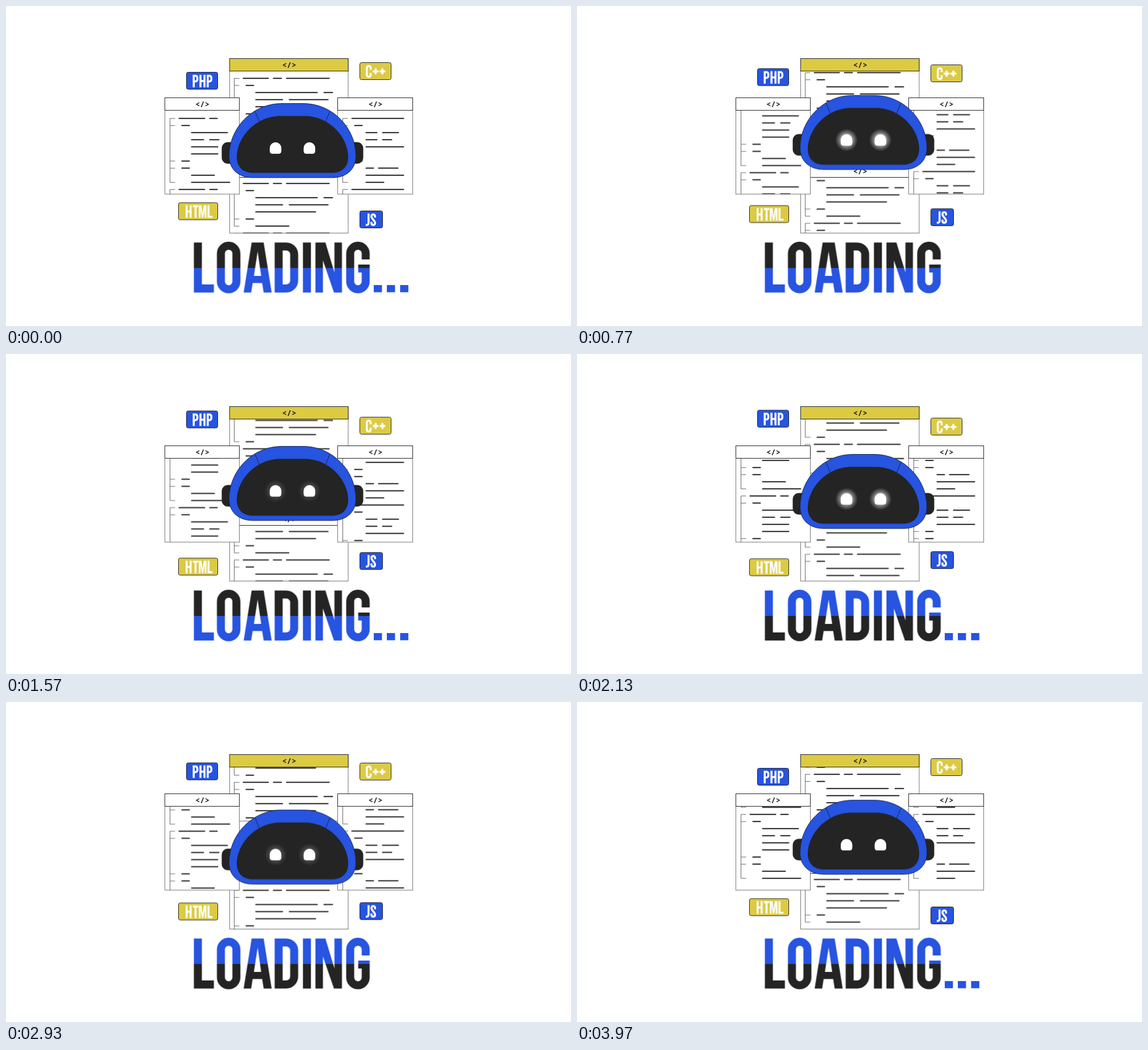
Animation, 994 px wide and 563 px high, one loop 4010 ms. Source, as an HTML page:

```html
<!DOCTYPE html>
<html lang="en">
<head>
<meta charset="utf-8">
<title>Loading</title>
<style>
  html, body { margin: 0; width: 100%; height: 100%; overflow: hidden; background: #fff; }
  svg { display: block; }
  :root { --loop: 4010ms; --ink: #242424; --blue: #2754e0; --gold: #dcca43; }

  .body { fill: #fff; stroke: #777; }
  .head { stroke: #222; }
  .tag { font: bold 14px "Noto Sans Mono", "DejaVu Sans Mono", monospace; text-anchor: middle; fill: #222; }
  .code { fill: none; stroke: #222; stroke-width: 2.1; stroke-linecap: round; }
  .rail { fill: none; stroke: #555; stroke-width: .9; }
  .outline { stroke: #1c2340; stroke-width: 1; }
  .badge rect { stroke: #222; }

  .scroll { animation: scroll var(--loop) linear infinite; }
  @keyframes scroll {
    0% { transform: none; }
    19.2% { transform: translateY(var(--s0)); }
    39.2% { transform: translateY(var(--s1)); }
    53.1% { transform: translateY(var(--s2)); }
    73.1% { transform: translateY(var(--s3)); }
    83% { transform: translateY(var(--s4)); }
    99%, 100% { transform: translateY(var(--s5)); }
  }

  .robot { animation: bob var(--loop) infinite; }
  @keyframes bob {
    0% { transform: none; animation-timing-function: cubic-bezier(.61, 1, .88, 1); }
    25% { transform: translateY(-15.3px); animation-timing-function: cubic-bezier(.37, 0, .63, 1); }
    75% { transform: translateY(18.6px); animation-timing-function: cubic-bezier(.12, 0, .39, 0); }
    100% { transform: none; }
  }

  .glow { animation: glow calc(var(--loop) / 6) cubic-bezier(.37, 0, .63, 1) infinite alternate; }
  @keyframes glow { from { opacity: 0; } to { opacity: 1; } }

  .badge { animation: float calc(var(--loop) / 2) cubic-bezier(.37, 0, .63, 1) infinite alternate; }
  @keyframes float { to { transform: translateY(var(--rise)); } }

  .upper { animation: upper var(--loop) step-end infinite; }
  .lower { animation: lower var(--loop) step-end infinite; }
  @keyframes upper { 0% { stop-color: #242424; } 50%, 100% { stop-color: #2754e0; } }
  @keyframes lower { 0% { stop-color: #2754e0; } 50%, 100% { stop-color: #242424; } }

  .dot { fill: var(--blue); animation: calc(var(--loop) / 2) step-end infinite; }
  .dot1 { animation-name: dot1; }
  .dot2 { animation-name: dot2; }
  .dot3 { animation-name: dot3; }
  @keyframes dot1 { 0% { opacity: 1; } 31% { opacity: 0; } 50%, 100% { opacity: 1; } }
  @keyframes dot2 { 0% { opacity: 1; } 31% { opacity: 0; } 60%, 100% { opacity: 1; } }
  @keyframes dot3 { 0% { opacity: 1; } 31% { opacity: 0; } 70%, 100% { opacity: 1; } }
</style>
</head>
<body>
<svg width="994" height="563" viewBox="0 0 994 563">
  <defs>
    <radialGradient id="halo">
      <stop offset=".4" stop-color="#fff" stop-opacity=".75"/>
      <stop offset=".7" stop-color="#fff" stop-opacity=".32"/>
      <stop offset="1" stop-color="#fff" stop-opacity="0"/>
    </radialGradient>
    <linearGradient id="duo" gradientUnits="userSpaceOnUse" x1="0" y1="0" x2="0" y2="100">
      <stop class="upper" offset=".505"/>
      <stop class="lower" offset=".505"/>
    </linearGradient>
    <path id="eye" d="M464 250a10.2 10.2 0 0 1 20.4 0v5q0 5-5 5h-10.4q-5 0-5-5z" fill="#fff"/>
  </defs>

  <g id="windows"></g>

  <g class="robot">
    <rect x="379.5" y="239.5" width="34" height="38" rx="11" fill="#242424"/>
    <rect x="594.5" y="239.5" width="34" height="38" rx="11" fill="#242424"/>
    <path class="outline" fill="#2754e0" d="M485 171.5H523C575 171.5 615.5 215 615.5 264C615.5 288 598 302 575 302H434C410 302 392.5 288 392.5 264C392.5 215 433 171.5 485 171.5Z"/>
    <path class="outline" d="M438 185L446 204M570 185L562 204"/>
    <path fill="#242424" d="M483 193.5H525C570 193.5 602 232 602 266C602 284 590 293.5 574 293.5H434C418 293.5 406 284 406 266C406 232 438 193.5 483 193.5Z"/>
    <g class="glow" fill="url(#halo)">
      <circle cx="474.2" cy="250" r="20"/>
      <circle cx="533.8" cy="250" r="20"/>
    </g>
    <use href="#eye"/>
    <use href="#eye" x="59.6"/>
  </g>

  <g id="badges"></g>
  <g id="title"></g>
  <rect class="dot dot1" x="647" y="491" width="14.4" height="12.6"/>
  <rect class="dot dot2" x="670" y="491" width="14.4" height="12.6"/>
  <rect class="dot dot3" x="693.4" y="491" width="14.4" height="12.6"/>
</svg>
<script>
const PITCH = 12.5;
const $ = id => document.getElementById(id);

// Condensed capitals, 100 units tall: [advance, path]
const GLYPHS = {
  L: [46, 'M8 0V92H40'],
  O: [53.5, 'M8 22a15.5 15.5 0 0 1 31 0v56a15.5 15.5 0 0 1-31 0z'],
  A: [62, 'M0 100L16 0H40L56 100H40L37 81H18L15 100zM20.5 67H35L28 18z'],
  D: [56.5, 'M8 8H23a16 16 0 0 1 16 16V76a16 16 0 0 1-16 16H8z'],
  I: [25, 'M8 0V100'],
  N: [61.5, 'M0 0H20L38 60V0H53V100H37L15 36V100H0z'],
  G: [53, 'M39 34V22a15.5 15.5 0 0 0-31 0v56a15.5 15.5 0 0 0 31 0V52H24'],
  P: [54, 'M8 100V8H22a15 15 0 0 1 15 15V38a15 15 0 0 1-15 15H8'],
  H: [58, 'M8 0V100M40 0V100M8 50H40'],
  T: [47, 'M0 8H43M21.5 8V100'],
  M: [70, 'M0 0H22L31 68L40 0H62V100H47V28L37 100H25L15 29V100H0z'],
  C: [55, 'M39 37V22a15.5 15.5 0 0 0-31 0v56a15.5 15.5 0 0 0 31 0V63'],
  J: [37, 'M0 92H7a15 15 0 0 0 15-15V0'],
  S: [45, 'M37 33V22a14.5 14.5 0 0 0-29 0c0 28 29 28 29 56a14.5 14.5 0 0 1-29 0V67'],
  '+': [54, 'M0 50H47M23.5 26V74']
};
const SOLID = 'ANM';

function word(text, x, y, scale, paint) {
  let pen = 0;
  const shapes = [...text].map(ch => {
    const [advance, d] = GLYPHS[ch];
    const style = SOLID.includes(ch)
      ? `fill="${paint}" fill-rule="evenodd"`
      : `fill="none" stroke="${paint}" stroke-width="16"`;
    const shape = `<path transform="translate(${pen})" d="${d}" ${style}/>`;
    pen += advance;
    return shape;
  });
  return `<g role="img" aria-label="${text}" transform="translate(${x} ${y}) scale(${scale})">${shapes.join('')}</g>`;
}

// One block of code rows, each a list of from-to spans measured from the rail
function block(rows, x, top) {
  const last = rows.length - 1;
  let code = '', rail = `M${x} ${top}V${top + last * PITCH}`;
  rows.forEach((row, i) => {
    const y = top + i * PITCH;
    const spans = row.split(' ').map(s => s.split('-').map(Number));
    for (const [a, b] of spans) code += `M${x + a + 1} ${y}H${x + b - 1}`;
    if (spans[0][0] < 37 || i === last) rail += `M${x} ${y}h9`;
  });
  return `<path class="rail" d="${rail}"/><path class="code" d="${code}"/>`;
}

function panel({ x, y, w, h, fill = '#fff', rail, top, rows, steps }) {
  const bar = 22, inner = y + bar, room = h - bar;
  const vars = steps.map((s, i) => `--s${i}:${-s}px`).join(';');
  return `<rect class="body" x="${x}" y="${y}" width="${w}" height="${h}"/>
    <svg x="${x}" y="${inner}" width="${w}" height="${room}" viewBox="${x} ${inner} ${w} ${room}">
      <g class="scroll" style="${vars}">
        ${block(rows, rail, top)}${block(rows, rail, top + rows.length * PITCH)}
      </g>
    </svg>
    <rect class="head" x="${x}" y="${y}" width="${w}" height="${bar}" fill="${fill}"/>
    <text class="tag" x="${x + w / 2 + .5}" y="${y + 16}">&lt;/&gt;</text>`;
}

const SHORT = '20-35';
const centre = ['15-61 68-84 91-168', SHORT, '37-147 157-174', '37-86 96-166', '37-144', SHORT];
const leftRows = ['15-62 69-84', SHORT, '37-102', '37-60 69-87', '37-85', '37-85',
  SHORT, SHORT, '37-79', '37-106'];
const rightRows = ['15-108', SHORT, '40-61 69-99', '40-61 69-87', '40-108',
  SHORT, SHORT, '40-55 62-98', '40-108', '40-73'];

$('windows').innerHTML = [
  { x: 393.5, y: 92.5, w: 208.5, h: 117, fill: '#dcca43', rail: 401.5, top: 127.3,
    rows: centre, steps: [10, 35.5, 43.3, 61, 65, 75] },
  { x: 393.5, y: 279.5, w: 208.5, h: 120, rail: 401.5, top: 312.3,
    rows: [...centre, '37-97'], steps: [17.5, 37.5, 47.5, 68.5, 73, 87.5] },
  { x: 279.5, y: 161.5, w: 131, h: 169.5, rail: 288.5, top: 197.8,
    rows: leftRows, steps: [29.5, 52.5, 73, 95.5, 106, 125] },
  { x: 583.5, y: 161.5, w: 132, h: 169.5, rail: 592.5, top: 197.8,
    rows: rightRows, steps: [31.5, 57.2, 73, 95.7, 109, 125] }
].map(panel).join('');

const badge = (text, x, y, w, textX, fill, rise, delay) =>
  `<g class="badge" style="--rise:${rise}px;animation-delay:${delay}ms">
    <rect x="${x}" y="${y}" width="${w}" height="30" rx="3" fill="${fill}"/>
    ${word(text, textX, y + 4.5, .22, '#fff')}
  </g>`;

$('badges').innerHTML =
  badge('PHP', 317.5, 116.5, 55, 328.5, '#2754e0', -18, -45) +
  badge('C++', 622.5, 99.5, 55, 633, '#dcca43', 13.3, -3977) +
  badge('HTML', 303.5, 346, 69, 316, '#dcca43', 14.4, -45) +
  badge('JS', 622.5, 360.5, 40, 633, '#2754e0', -13, -3977);

$('title').innerHTML = word('LOADING', 330.5, 416, .88, 'url(#duo)');
</script>
</body>
</html>
```
